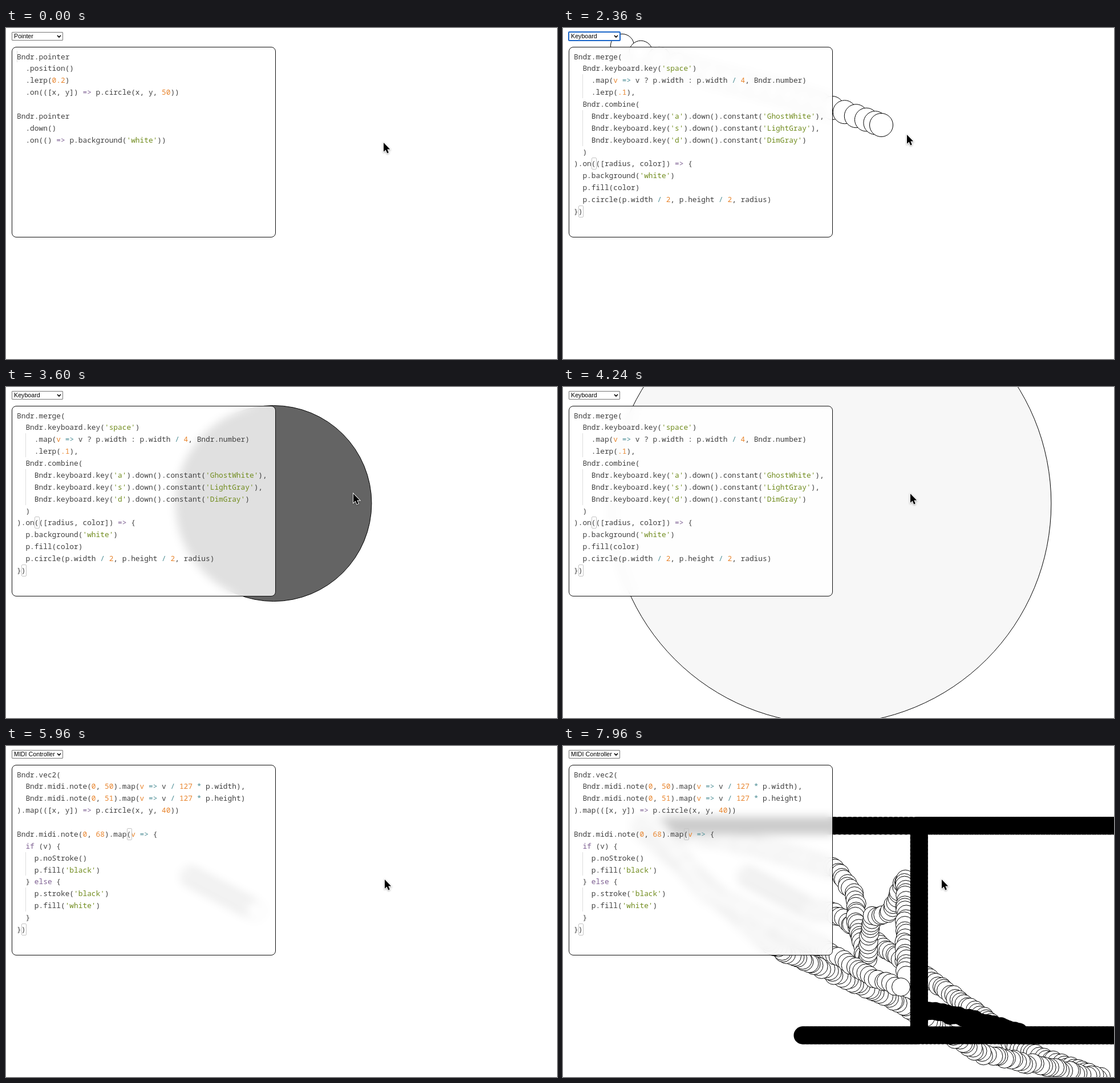
Animation of 966x580 px, one loop 8 s. Source, as an HTML page with a canvas:

```html
<!DOCTYPE html>
<html lang="en">
<head>
<meta charset="utf-8">
<title>Input bindings demo</title>
<style>
html, body { margin: 0; width: 100%; height: 100%; overflow: hidden; background: #fff; }
body { position: relative; }
canvas, #cursor { position: absolute; left: 0; top: 0; }
#panel {
  position: absolute; left: 10px; top: 33px; width: 463px; height: 334px; box-sizing: border-box;
  border: 1px solid #111; border-radius: 8px;
  background: rgba(255, 255, 255, .8); backdrop-filter: blur(8px);
}
#code {
  position: absolute; left: 19px; top: 39.5px; margin: 0; color: #404040;
  font: 500 12.83px/20.88px "Noto Sans Mono", monospace; font-variant-ligatures: none;
}
#code i { position: absolute; box-sizing: border-box; }
#code .box { width: 9px; height: 21px; border: 1px solid #c4c4c4; border-radius: 2px; }
#code .guide { width: 1px; background: #ddd; }
.num { color: #e8842c; } .str { color: #718c1e; }
.key { color: #7d5f92; } .op { color: #4a8c94; }
#select {
  position: absolute; left: 10px; top: 7px; width: 90px; height: 15px; box-sizing: border-box;
  padding-left: 3px; border: 1px solid #767676; border-radius: 1px; background: #fff; color: #000;
  font: 10.7px/13px "Liberation Sans", Arial, sans-serif; white-space: nowrap;
}
#select.focus { box-shadow: 0 0 0 1px #1a66c9; border-color: #1a66c9; }
#select svg { position: absolute; right: 2px; top: 4px; }
</style>
</head>
<body>
<canvas id="canvas" width="966" height="580"></canvas>
<div id="panel"></div>
<pre id="code"></pre>
<div id="select"><span id="label"></span><svg width="8" height="6"><path d="M1 1l3 3l3-3" fill="none" stroke="#000" stroke-width="1.7"/></svg></div>
<svg id="cursor" width="24" height="28" style="overflow:visible;filter:drop-shadow(0 1.5px 1.5px rgba(0,0,0,.35))">
  <path d="M0 0V15.8L3.7 12.5L6.2 18.4L8.8 17.3L6.3 11.5H11.2Z" stroke="#fff" stroke-width="1.8" paint-order="stroke"/>
</svg>
<script>
const LOOP = 8000, FRAME = 40, COL = 7.7, ROW = 20.88;
const $ = id => document.getElementById(id);
const ctx = $('canvas').getContext('2d');

// boxes: matched brackets as [row, col]; guides: indent lines as [row, col, rows]
const scenes = [
  { at: 0, name: 'Pointer', boxes: [], guides: [[0, 0, 1]], code: `Bndr.pointer
  .position()
  .lerp(0.2)
  .on(([x, y]) => p.circle(x, y, 50))

Bndr.pointer
  .down()
  .on(() => p.background('white'))` },
  { at: 2200, name: 'Keyboard', boxes: [[9, 4], [13, 1]], guides: [[2, 2, 2], [5, 2, 3]], code: `Bndr.merge(
  Bndr.keyboard.key('space')
    .map(v => v ? p.width : p.width / 4, Bndr.number)
    .lerp(.1),
  Bndr.combine(
    Bndr.keyboard.key('a').down().constant('GhostWhite'),
    Bndr.keyboard.key('s').down().constant('LightGray'),
    Bndr.keyboard.key('d').down().constant('DimGray')
  )
).on(([radius, color]) => {
  p.background('white')
  p.fill(color)
  p.circle(p.width / 2, p.height / 2, radius)
})` },
  { at: 5560, name: 'MIDI Controller', boxes: [[5, 25], [13, 1]], guides: [[7, 2, 2], [10, 2, 2]], code: `Bndr.vec2(
  Bndr.midi.note(0, 50).map(v => v / 127 * p.width),
  Bndr.midi.note(0, 51).map(v => v / 127 * p.height)
).map(([x, y]) => p.circle(x, y, 40))

Bndr.midi.note(0, 68).map(v => {
  if (v) {
    p.noStroke()
    p.fill('black')
  } else {
    p.stroke('black')
    p.fill('white')
  }
})` },
];

const tokens = /(?<str>'[^']*')|(?<num>\bv(?= =>)|(?<!\w)(?:\d*\.)?\d+)|(?<op>(?<=v )=>|[\/*])|(?<key>=>|\b(?:if|else)\b)/g;
const highlight = code => code.replace(tokens, (text, ...rest) => {
  const groups = rest.at(-1);
  const kind = Object.keys(groups).find(k => groups[k]);
  return `<span class="${kind}">${text.replace('>', '&gt;')}</span>`;
});
const mark = (kind, row, col, height = '') =>
  `<i class="${kind}" style="left:${col * COL}px;top:${row * ROW}px;${height}"></i>`;
for (const s of scenes) {
  s.html = highlight(s.code)
    + s.boxes.map(([r, c]) => mark('box', r, c)).join('')
    + s.guides.map(([r, c, n]) => mark('guide', r, c, `height:${n * ROW}px`)).join('');
}

// The cursor wanders in loops, then eases to each stop in turn
const stops = [
  { from: 1700, to: 1940, x: 60, y: 14 },
  { from: 2150, to: 2340, x: 603, y: 187 },
  { from: 2380, to: 2480, x: 609, y: 187 },
  { from: 5100, to: 5300, x: 52, y: 14 },
  { from: 5450, to: 5670, x: 664, y: 234 },
];
const mix = (a, b, u) => a + (b - a) * u;
function cursorAt(t) {
  const s = Math.min(Math.max(t - 80, 0), 1700) / 1000;
  let x = 477 + 370 * Math.cos(1.047 + 5.2 * s);
  let y = 300 - 190 * Math.cos(1.023 + 7.4 * s);
  for (const stop of stops) {
    const u = Math.min(Math.max((t - stop.from) / (stop.to - stop.from), 0), 1);
    const eased = u * u * (3 - 2 * u);
    x = mix(x, stop.x, eased);
    y = mix(y, stop.y, eased);
  }
  return [x, y];
}

// Stamped circles, each with the time it appears
const stamps = [];
const stamp = (t, x, y, r, fill = '#fff') => stamps.push({ t, x, y, r, fill });

function along(points, gap) {
  const lengths = points.slice(1).map((p, i) => Math.hypot(p[0] - points[i][0], p[1] - points[i][1]));
  const total = lengths.reduce((a, b) => a + b);
  const n = Math.round(total / gap);
  return Array.from({ length: n + 1 }, (_, k) => {
    let d = total * k / n, i = 0;
    while (i < lengths.length - 1 && d > lengths[i]) d -= lengths[i++];
    const u = d / lengths[i], a = points[i], b = points[i + 1];
    return [mix(a[0], b[0], u), mix(a[1], b[1], u)];
  });
}
const random = i => {
  const v = Math.sin(i * 12.9898) * 43758.5453;
  return v - Math.floor(v);
};
function stroke(from, to, points, { r = 16, fill, wobble = 0 } = {}) {
  points.forEach(([x, y], i) => stamp(
    mix(from, to, i / (points.length - 1)),
    x + wobble * (random(i) - .5), y + wobble * (random(i + .5) - .5), r, fill));
}

const POINTER_R = 20.5;
let [px, py] = cursorAt(0);
for (let t = 80; t < 1960; t += 16) {
  const [cx, cy] = cursorAt(t);
  px = mix(px, cx, .2);
  py = mix(py, cy, .2);
  stamp(t, px, py, POINTER_R);
}
for (let i = 0; i <= 18; i++) {
  const u = 1 - (1 - i / 18) ** 1.3;
  stamp(2160 + i * 11, mix(104, 558, u), mix(31, 170, u) + 4 * Math.sin(2 * Math.PI * u), POINTER_R);
}
for (let i = 1; i <= 5; i++) {
  const u = 1 - .8 ** i;
  stamp(2350 + i * 22, mix(558, 609, u), mix(170, 187, u), POINTER_R);
}

const white = { wobble: 5 };
const black = { r: 15.7, fill: '#000' };
stroke(5930, 5955, along([[322, 228], [437, 288]], 4));
stroke(5965, 7060, along([
  [437, 288], [475, 292], [740, 476], [800, 530], [945, 582], [735, 540], [585, 448], [370, 353],
  [135, 140], [300, 165], [475, 213], [513, 262], [514, 310], [532, 378],
  [540, 299], [572, 292], [600, 231], [600, 400],
], 6.5), white);
stroke(7080, 7200, along([[632, 462], [705, 476], [800, 501]], 7), { ...black, wobble: 4 });
stroke(7205, 7590, along([[800, 507], [975, 507], [418, 507], [624.3, 507], [624.3, 140]], 7), black);
stroke(7610, 7800, along([[624.3, 139.7], [985, 139.7], [180, 139.7]], 9), black);
stroke(7810, 7955, along([[160, 137], [250, 255], [460, 355], [545, 408], [592, 421]], 8), white);

// Space key: the big circle grows after each odd time and shrinks after each even one
const keyTimes = [2600, 3240, 3393.5, 3860, 3920, 4109, 4500];
function bigCircle(t) {
  let r = 504;
  keyTimes.forEach((at, i) => {
    if (t < at) return;
    const end = Math.min(t, keyTimes[i + 1] ?? t), goal = i % 2 ? 504 : 122;
    r = Math.max(126, mix(goal, r, Math.exp((at - end) / 120)));
  });
  const fill = t < 3860 ? '#646464' : t < 4109 ? '#d3d3d3' : '#f7f7f7';
  return { x: 469.4, y: 204, r, fill };
}

function drawCircle({ x, y, r, fill }) {
  ctx.beginPath();
  ctx.arc(x, y, r, 0, 2 * Math.PI);
  ctx.fillStyle = fill;
  ctx.fill();
  if (fill !== '#000') ctx.stroke();
}

const clears = [0, 1960, 2600, 5600];
let lastTime = -1, lastScene;
function render(t) {
  const scene = scenes.findLast(s => s.at <= t);
  if (scene !== lastScene) {
    lastScene = scene;
    $('code').innerHTML = scene.html;
    $('label').textContent = scene.name;
  }
  $('select').classList.toggle('focus', t >= 2200 && t < 2600);
  const [x, y] = cursorAt(t);
  $('cursor').style.transform = `translate(${x}px, ${y}px)`;

  ctx.clearRect(0, 0, 966, 580);
  ctx.strokeStyle = '#000';
  ctx.lineWidth = 1;
  const since = clears.findLast(c => c <= t);
  if (since === 2600) drawCircle(bigCircle(t));
  for (const s of stamps) if (s.t >= since && s.t <= t) drawCircle(s);
}

const start = performance.now();
function tick() {
  const t = Math.floor((performance.now() - start) % LOOP / FRAME) * FRAME;
  if (t !== lastTime) render(lastTime = t);
  requestAnimationFrame(tick);
}
tick();
</script>
</body>
</html>
```
